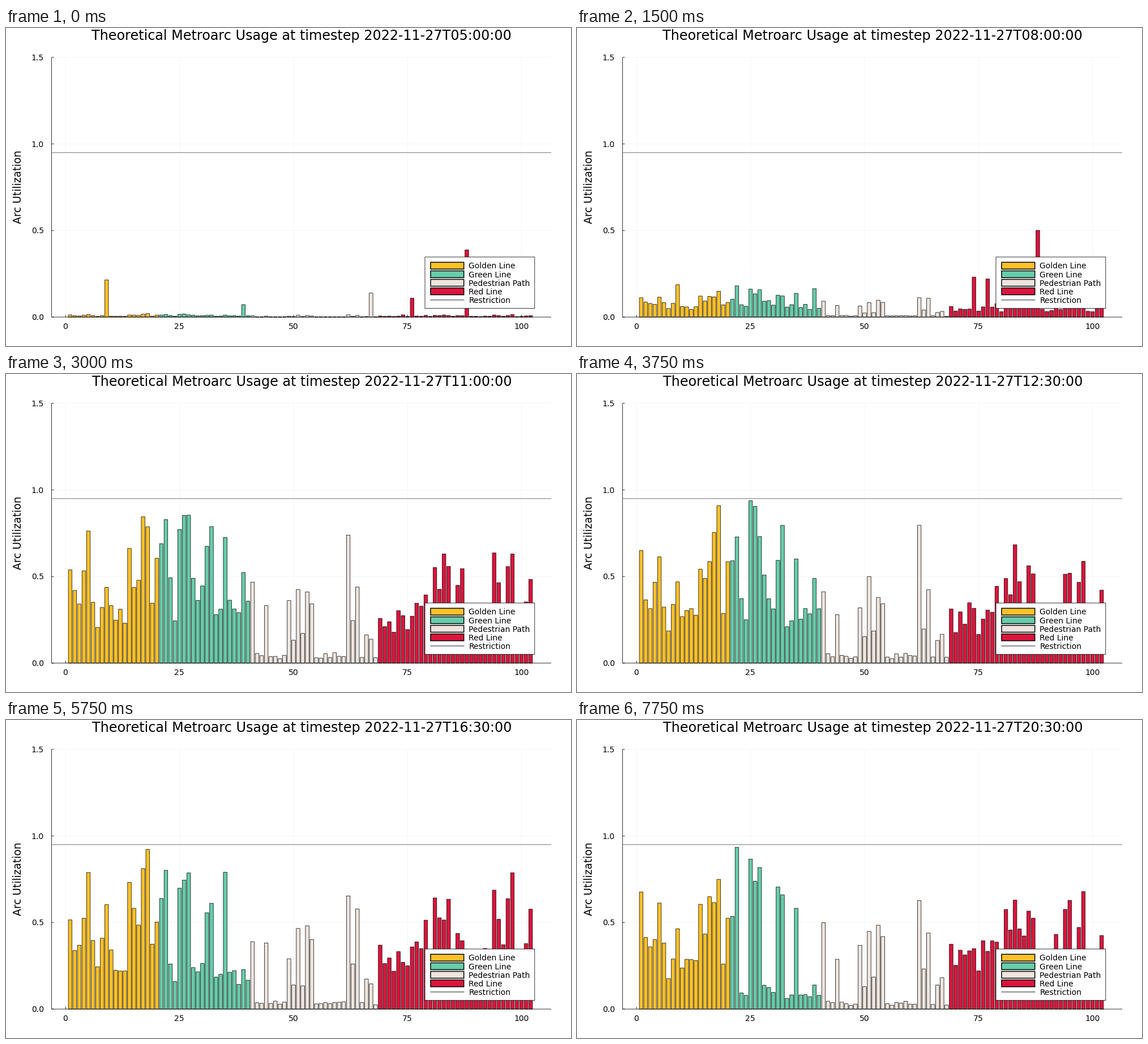
A matplotlib script for the animation above (8000 ms loop, 998 by 561 pixels).

```python
import numpy as np
import matplotlib.pyplot as plt
from matplotlib.animation import FuncAnimation
from matplotlib.patches import Rectangle

W, H, DPI = 998, 561, 100
FRAMES, STEP_MS = 32, 250
PT = 72 / DPI

LEFT, RIGHT, TOP, BASE = 80.5, 963, 51.8, 510.0
X0, X_UNIT, Y_UNIT = 105.3, 8.053, 305.5
LIMIT = 0.95

# Name, color, arc count, quiet level, quiet gain at 11:00 and at 20:30
LINES = [
    ("Golden Line", "#FFC125", 20, 0.32, 1.0, 0.9),
    ("Green Line", "#66CDAA", 20, 0.20, 2.0, 0.5),
    ("Pedestrian Path", "#EEE5DE", 28, 0.04, 1.0, 0.8),
    ("Red Line", "#DC143C", 34, 0.28, 0.85, 1.1),
]

# Typical daytime level of the busy arcs
BUSY = {
    1: 0.59, 4: 0.46, 5: 0.68, 9: 0.52, 14: 0.64, 15: 0.51, 16: 0.56,
    17: 0.73, 18: 0.87, 20: 0.53,
    21: 0.60, 22: 0.82, 25: 0.82, 26: 0.79, 27: 0.78, 31: 0.61, 32: 0.69,
    35: 0.69,
    41: 0.43, 44: 0.33, 49: 0.32, 50: 0.14, 51: 0.47, 52: 0.16, 53: 0.45,
    54: 0.39, 62: 0.69, 63: 0.23, 64: 0.50, 66: 0.15, 67: 0.16,
    79: 0.45, 81: 0.58, 82: 0.47, 83: 0.59, 84: 0.55, 86: 0.52, 87: 0.47,
    94: 0.60, 95: 0.55, 97: 0.55, 98: 0.70, 102: 0.50,
}

# Early peaks: heights at 05:00 and 08:00
EARLY = {9: (0.215, 0.187), 39: (0.072, 0.164), 67: (0.139, 0),
         74: (0.013, 0.231), 76: (0.109, 0.058), 77: (0, 0.22),
         88: (0.388, 0.501)}

rng = np.random.default_rng(7)
counts = [line[2] for line in LINES]
total = sum(counts)
quiet, gain_start, gain_end = (
    np.repeat([line[k] for line in LINES], counts) for k in (3, 4, 5))
level = quiet * rng.uniform(0.7, 1.3, total)
for arc, value in BUSY.items():
    level[arc - 1] = value
    gain_start[arc - 1] = gain_end[arc - 1] = 1
phase = rng.uniform(0, 2 * np.pi, total)
speed = rng.uniform(0.5, 1.1, total)


def utilization(hour):
    rise = np.interp(hour, [5, 8, 11], [0.02, 0.19, 1])
    day = np.clip((hour - 11) / 9.5, 0, 1)
    gain = gain_start + (gain_end - gain_start) * day
    sway = 1 + 0.16 * np.sin(speed * hour + phase)
    use = level * rise * gain * sway
    for arc, (first, second) in EARLY.items():
        peak = np.interp(hour, [5, 8, 11], [first, second, 0])
        use[arc - 1] = max(use[arc - 1], peak)
    return np.minimum(use, LIMIT)


plt.rcParams["font.family"] = "DejaVu Sans"
fig = plt.figure(figsize=(W / DPI, H / DPI), dpi=DPI, facecolor="white")
ax = fig.add_axes([0, 0, 1, 1])
ax.set_xlim(0, W)
ax.set_ylim(H, 0)
ax.axis("off")


def line(xs, ys, color="black", width=0.8, z=1):
    ax.plot(xs, ys, color=color, lw=width * PT, zorder=z,
            solid_capstyle="butt", snap=False)


def label(x, y, text, size, **kw):
    return ax.text(x, y, text, fontsize=size * PT, zorder=6, **kw)


def box(x, y, w, h, color, width, z):
    rect = Rectangle((x, y), w, h, fc=color, ec="black", lw=width * PT,
                     zorder=z, snap=False, joinstyle="miter")
    return ax.add_patch(rect)


# Axes, grid and ticks
for value in (0, 25, 50, 75, 100):
    x = X0 + value * X_UNIT
    line([x, x], [TOP, BASE], "#F3F3F3")
    line([x, x], [BASE, BASE - 4], z=2)
    label(x - 0.3, 531, str(value), 14, ha="center")
for value in (0, 0.5, 1, 1.5):
    y = BASE - value * Y_UNIT
    line([LEFT, RIGHT], [y, y], "#F3F3F3")
    line([LEFT, LEFT + 4], [y, y], z=2)
    label(67, y + 5, f"{value:.1f}", 14, ha="right")
line([LEFT, LEFT], [TOP, BASE], z=2)
line([LEFT, RIGHT], [BASE, BASE], z=4)
limit_y = BASE - LIMIT * Y_UNIT
line([LEFT, RIGHT], [limit_y, limit_y], "#999999", 1.4, z=4)
label(27, 280.5, "Arc Utilization", 18.6, rotation=90, ha="center",
      va="baseline", rotation_mode="anchor")
title = label(522.4, 21, "", 23.85, ha="center")

# Bars
colors = np.repeat([entry[1] for entry in LINES], counts)
bars = [box(X0 + (i + 0.6) * X_UNIT, BASE, 0.8 * X_UNIT, 0, color, 0.75, 3)
        for i, color in enumerate(colors)]

# Legend
box(740, 404, 193.8, 90.7, "white", 0.8, 5)
for row, (name, color, *_) in enumerate(LINES):
    y = 419.3 + 15.1 * row
    box(750, y - 6, 58.7, 12, color, 1.5, 6)
    label(817.5, y + 5.1, name, 13.9)
line([749.5, 809.5], [479.7, 479.7], "#999999", 2.4, z=6)
label(817.5, 484.8, "Restriction", 13.9)


def update(step):
    hour = 5 + step / 2
    minute = 30 * (step % 2)
    title.set_text("Theoretical Metroarc Usage at timestep "
                   f"2022-11-27T{int(hour):02d}:{minute:02d}:00")
    for bar, use in zip(bars, utilization(hour)):
        bar.set_height(-Y_UNIT * use)
    return [title, *bars]


anim = FuncAnimation(fig, update, frames=FRAMES, interval=STEP_MS,
                     repeat=True, repeat_delay=0)
plt.show()
```
